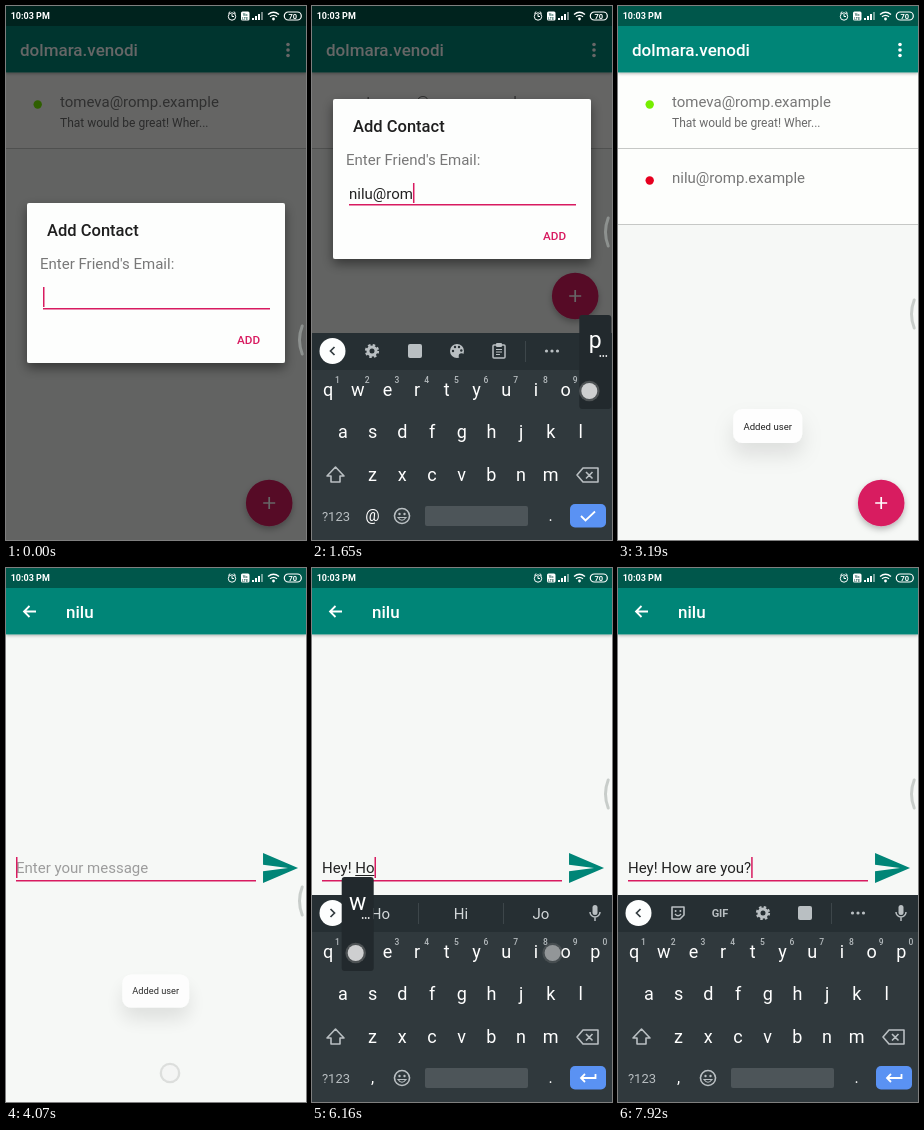
Write an HTML page that moves like this. It is 300 px wide and 534 px high and loops after 8000 ms.

```html
<!DOCTYPE html>
<html lang="en">
<head>
<meta charset="utf-8">
<title>Chat demo</title>
<style>
  html, body { margin: 0; width: 100%; height: 100%; overflow: hidden; background: #f6f8f6; }
  svg { display: block; width: 100vw; height: 100vh; }
  text { font-family: Roboto, "Noto Sans", sans-serif; white-space: pre; }
  .m { font-weight: 500; }
  .b { font-weight: 700; }
  .c { text-anchor: middle; }
</style>
</head>
<body>
<svg id="stage" viewBox="0 0 300 534"></svg>
<script>
const TICK = 110, LOOP = 8000;
const TEAL = '#008577', PINK = '#d81b60', INK = '#222', KEY = '#fff', SOFT = '#b9bfc2';
const ME = 'dolmara.venodi', OLD = 'tomeva@romp.example', MAIL = 'nilu@romp.example';
const NAME = 'nilu', MSG = 'Hey! How are you?';

// Ticks at which each character is pressed
const mailTicks = [4, 5, 6, 7, 9, 10, 11, 12, 15, 16, 17, 18, 19, 20, 21, 22, 23];
const msgTicks = [40, 41, 42, 46, 48, 52, 55, 56, 58, 59, 60, 61, 63, 64, 65, 66, 69];

// Motion tables: [tick, value]
const kbSteps = [[1, 207], [2, 90], [3, 15], [4, 0], [26, 0], [27, 60], [28, 150], [29, 207],
  [37, 207], [38, 110], [39, 30], [40, 0]];
const dialogSteps = [[2, 0], [3, -104]];
const fabSteps = [[2, 497], [3, 290], [26, 290], [27, 497]];
const handleSteps = [[2, 334], [3, 226], [27, 226], [28, 270], [29, 308], [30, 333],
  [37, 333], [38, 280], [39, 226]];
const dimSteps = [[25, 1], [26, .4], [27, 0]];
const chatSteps = [[31, 300], [32, 180], [33, 60], [34, 10], [35, 0]];
const fieldSteps = [[36, 207], [37, 0]];
const toastFade = [[26, 0], [27, .4], [28, .9], [29, 1], [36, 1], [37, .95], [38, .35], [39, 0]];
const toastSize = [[27, .95], [29, 1], [36, 1], [37, .967], [38, .93]];
const toastDrop = [[36, 0], [37, 3], [38, 6]];

const suggest = {
  H: 'H|He|Hi', He: 'He|Hey|Her', Hey: 'Hey|Get|Het', 'Hey! ': 'How|I|What',
  Ho: 'Ho|Hi|Jo', How: 'How|Hoe|Now', 'How ': 'are|is|do',
  a: 'a|are|and', ar: 'ar|are|at', are: 'are|ate|age', 'are ': 'you|the|we',
  y: 'y|you|your', yo: 'yo|you|to', you: 'you|your|yoyo'
};

const at = (n, steps) => {
  if (n <= steps[0][0]) return steps[0][1];
  for (let i = 1; i < steps.length; i++) {
    const [a, v] = steps[i - 1], [b, w] = steps[i];
    if (n <= b) return v + (w - v) * (n - a) / (b - a);
  }
  return steps[steps.length - 1][1];
};

// Markup helpers
const txt = (x, y, size, fill, s, cls = '', id = '') =>
  `<text x="${x}" y="${y}" font-size="${size}" fill="${fill}" class="${cls}" ${id && `id="${id}"`}>${s}</text>`;
const rect = (x, y, w, h, fill, r = 0, more = '') =>
  `<rect x="${x}" y="${y}" width="${w}" height="${h}" rx="${r}" fill="${fill}" ${more}/>`;
const dot = (x, y, r, fill, more = '') => `<circle cx="${x}" cy="${y}" r="${r}" fill="${fill}" ${more}/>`;
const line = (d, stroke, w = 1.5, more = '') =>
  `<path d="${d}" fill="none" stroke="${stroke}" stroke-width="${w}" ${more}/>`;
const grp = (id, s, more = '') => `<g id="${id}" ${more}>${s}</g>`;
const move = (x, y, s) => `<g transform="translate(${x} ${y})">${s}</g>`;

// Keyboard geometry
const keys = {};
['qwertyuiop', 'asdfghjkl', 'zxcvbnm'].forEach((row, r) =>
  [...row].forEach((k, i) => keys[k] = [[16, 31, 60.5][r] + i * 29.7, [384, 425.5, 468.5][r]]));
Object.assign(keys, { '@': [60, 510], ' ': [164, 510], '.': [238, 510], '!': [238, 510], '?': [238, 510] });
const slip = { o: -13, p: -6, w: -2 };

const dots = (x, y) => [-5.5, 0, 5.5].map(d => dot(x + d, y, 1.6, SOFT)).join('');
const gear = x => move(x, 345, dot(0, 0, 4, 'none', `stroke="${SOFT}" stroke-width="3"`) +
  dot(0, 0, 6, 'none', `stroke="${SOFT}" stroke-width="2.2" stroke-dasharray="2.5 2.212"`));
const square = x => rect(x - 7, 338, 14, 14, SOFT, 2);
const mic = move(283, 345, rect(-2.5, -8, 5, 10, SOFT, 2.5) + line('M-5 -1a5 5 0 0 0 10 0M0 4V8', SOFT));
const palette = move(145, 345, dot(0, 0, 7, SOFT) + dot(4.5, 5, 2.8, '#262f33') +
  [[-4, 0], [-2, -4], [2, -4], [4.3, -.5]].map(([x, y]) => dot(x, y, 1.2, '#262f33')).join(''));
const clip = move(187, 345, rect(-6, -6, 12, 13, 'none', 1, `stroke="${SOFT}" stroke-width="1.5"`) +
  rect(-3, -8, 6, 4, SOFT, 1) + line('M-3 -1.5H3M-3 1H3M-3 3.5H1', SOFT, 1.2));
const sticker = move(60, 345, line('M-6 -6H6V2L2 6H-6Z', SOFT, 1.6, 'stroke-linejoin="round"') +
  dot(-2.4, -2, 1, SOFT) + dot(2.4, -2, 1, SOFT) + line('M-3 1Q0 4.5 3 1', SOFT, 1.3));
const arrow = d => dot(20.5, 345, 13, '#fdfefe') +
  line(`M${20.5 - 2 * d} 341l${4 * d} 4l${-4 * d} 4`, '#333c40', 1.7);
const rule = x => line(`M${x} 335V356`, '#3d464a', 1);

const keyboard = () => {
  let s = rect(0, 327, 300, 207, '#30393d') + rect(0, 327, 300, 37, '#262f33');
  [...'qwertyuiop'].forEach((k, i) =>
    s += txt(keys[k][0] + 9.5, 377, 8.5, '#b4babd', (i + 1) % 10, 'c m'));
  for (const k in keys) if (/[a-z]/.test(k))
    s += txt(keys[k][0], keys[k][1] + 6, 18, KEY, k, 'c');
  s += line('M23.5 461L32 470H28V476H19V470H15Z', SOFT, 1.6, 'stroke-linejoin="round"');
  s += line('M271 462H286V476H271L265 469ZM274 466l6.5 6.5M280.5 466l-6.5 6.5', SOFT, 1.6, 'stroke-linejoin="round"');
  s += txt(24, 514.5, 13, SOFT, '?123', 'c') + txt(60.5, 515, 16, KEY, '', 'c', 'side');
  s += dot(90, 510, 7.5, 'none', `stroke="${SOFT}" stroke-width="1.6"`) +
    dot(87.5, 508, 1.2, SOFT) + dot(92.5, 508, 1.2, SOFT) + line('M86 511.5Q90 517 94 511.5Z', SOFT, 1.2);
  s += rect(113, 500, 103, 20, '#4d5559', 2) + txt(238.5, 515, 16, KEY, '.', 'c');
  s += rect(258, 498, 36, 23.5, '#5a92f3', 5) + line('', '#fff', 1.8, 'id="enter"');
  s += grp('barMail', arrow(-1) + gear(60) + square(103) + palette + clip + rule(213.5) + dots(240, 345));
  s += grp('barTools', arrow(-1) + sticker + txt(102, 349, 11, SOFT, 'GIF', 'c b') + gear(145) +
    square(187) + rule(213.5) + dots(240, 345) + mic);
  s += grp('barWords', arrow(1) + rule(106.5) + rule(191.5) + mic +
    [68.5, 149, 229].map((x, i) => txt(x, 350.5, 15, '#d3d8da', '', 'c', 'word' + i)).join(''));
  return s;
};

const appBar = rect(0, 0, 300, 66.4, TEAL, 0, 'filter="url(#low)"') + rect(0, 0, 300, 20, '#00574b');

const row = (y, color, mail) => rect(0, y, 300, 75, '#fdfefc') + rect(0, y + 75, 300, 1, '#c6c8c6') +
  dot(31.7, y + 31.5, 4.2, color) + txt(54, y + 34, 15, '#777', mail);

const list = rect(0, 0, 300, 534, '#f6f8f6') +
  row(67, '#76ee00', OLD) + txt(54, 121, 12, '#6a6a6a', 'That would be great! Wher...') +
  grp('newRow', row(143, '#e6001f', MAIL)) +
  appBar + txt(14, 50, 17, '#fff', ME, 'm') +
  [38.5, 44, 49.5].map(y => dot(282, y, 1.8, '#fff')).join('') +
  grp('fab', dot(0, 0, 23.3, PINK, 'filter="url(#mid)"') + line('M-6 0H6M0 -6V6', '#fff', 1.7));

const chat = rect(0, 0, 300, 534, '#f6f8f6') + appBar +
  line('M30 43.5H18M23.5 38L18 43.5L23.5 49', '#fff', 1.8) + txt(60, 50, 17, '#fff', NAME, 'm') +
  grp('field', txt(10, 305, 15, '#9c9c9c', 'Enter your message', '', 'hint') +
    txt(10, 305, 15, INK, '', '', 'msg') + rect(10, 307, 0, 1, INK, 0, 'id="under"') +
    rect(10, 312, 240, 1.5, PINK) + rect(10, 289, 1.5, 21, PINK, 0, 'id="msgCaret"') +
    `<path transform="translate(253.7 280) scale(1.667)" fill="${TEAL}" d="M2 21L23 12 2 3V10L17 12 2 14Z"/>`);

const dialog = rect(21, 197, 258, 160, '#fdfefd', 2, 'filter="url(#deep)"') +
  txt(41, 229.5, 16.5, '#1f1f1f', 'Add Contact', 'm') +
  txt(34, 263, 15, '#787878', "Enter Friend's Email:") +
  txt(37, 297, 15, INK, '', '', 'mail') + rect(37, 302, 227, 1.5, PINK) +
  rect(37, 281, 1.5, 20, PINK, 0, 'id="mailCaret"') + txt(231, 338, 11.7, PINK, 'ADD', 'm');

const toast = rect(-34.5, -17, 69, 34, '#fefefe', 9, 'filter="url(#high)"') +
  txt(0, 3.5, 9.6, INK, 'Added user', 'c');

const status = txt(4.7, 13.3, 9, '#fff', '10:03 PM', 'b') +
  line('M222.5 7.5L224 5.5M229.5 7.5L228 5.5M226 8V10.5H228', '#fff', 1) +
  dot(226, 10.5, 3.7, 'none', 'stroke="#fff"') +
  rect(235, 5.5, 8.5, 9, '#fff', 1.5) + txt(239.2, 9.7, 4, '#00443b', 'Vo', 'c m') +
  txt(239.2, 13.5, 3.6, '#00443b', 'LTE', 'c m') +
  [0, 1, 2, 3].map(i => rect(246 + i * 3, 12 - i * 2, 2, 2 + i * 2, '#fff', 0, i > 2 ? 'opacity=".45"' : '')).join('') +
  line('M262 8.5Q267.5 4 273 8.5M264 10.8Q267.5 8 271 10.8', '#fff', 1.4) +
  dot(267.5, 13, 1.4, '#fff') + rect(278.3, 6, 17, 8, 'none', 4, 'stroke="#fff" stroke-width="1.2"') +
  txt(286.8, 12.8, 7.5, '#fff', '70', 'c b');

const $ = id => document.getElementById(id);
const set = (id, name, v) => $(id).setAttribute(name, v);
const show = (id, on) => $(id).style.display = on ? '' : 'none';
const shift = (id, x, y) => set(id, 'transform', `translate(${x} ${y})`);

const shadow = (id, dy, blur, a) => `<filter id="${id}" x="-40%" y="-60%" width="180%" height="260%">
  <feDropShadow dx="0" dy="${dy}" stdDeviation="${blur}" flood-opacity="${a}"/></filter>`;
$('stage').innerHTML = '<defs>' + shadow('low', 1.2, 1.5, .3) + shadow('mid', 3, 3, .28) +
  shadow('deep', 5, 6, .45) + shadow('high', 12, 10, .1) + '</defs>' +
  list + grp('chat', chat) + rect(0, 0, 300, 534, '#000', 0, 'id="dim"') +
  grp('dialog', dialog) + grp('kb', keyboard()) + grp('toast', toast) +
  line('M296.2 -14Q290.8 0 296.2 14', '#aab0ad', 3, 'id="handle" stroke-linecap="round" opacity=".6"') +
  grp('touch', '') + status;

const presses = [[MAIL, mailTicks], [MSG, msgTicks]].flatMap(([s, ticks]) =>
  ticks.map((n, i) => {
    const k = s[i].toLowerCase(), [x, y] = keys[k];
    return { n, k, x, y, tx: x + (slip[k] || 0), ty: y + 1 };
  }));
presses.push({ n: 25, tx: 243, ty: 231 }, { n: 30, tx: 150, ty: 180 }, { n: 36, tx: 164, ty: 505 });

const popup = ({ k, x, y }) => rect(x - 16, y - 75, 32, 94, '#22292d', 3) +
  txt(x, y - 42, 23, '#fff', k, 'c') +
  (y < 400 ? [5, 8, 11].map(d => dot(x + d, y - 34, .9, '#eee')).join('') : '');
const ring = ({ tx, ty }, alpha) => `<g opacity="${alpha}">` +
  dot(tx, ty, 10.3, '#8d8f8e', 'opacity=".45"') + dot(tx, ty, 8, '#fafafa', 'opacity=".85"') + '</g>';

const touches = n => {
  let pops = '', rings = '';
  for (const p of presses) {
    const age = n - p.n;
    if (age < 0 || age > 2) continue;
    if (age === 0 && /[a-z]/.test(p.k || '')) pops += popup(p);
    if (age < 2) rings += ring(p, age ? .55 : .9);
    else if (p.k) rings += dot(p.x, p.y, 9.5, '#000', 'opacity=".1"');
  }
  return pops + rings;
};

const typed = (s, ticks, n) => s.slice(0, ticks.filter(k => k < n).length);

function draw(n) {
  const inChat = n >= 34, dim = at(n, dimSteps);
  shift('kb', 0, at(n, kbSteps));
  shift('dialog', 0, at(n, dialogSteps));
  shift('fab', 263.2, at(n, fabSteps));
  shift('handle', 0, at(n, handleSteps));
  shift('chat', at(n, chatSteps), 0);
  shift('field', 0, at(n, fieldSteps));
  set('dim', 'opacity', dim * .6);
  set('dialog', 'opacity', dim);
  set('toast', 'opacity', at(n, toastFade));
  set('toast', 'transform', `translate(149.7 ${420 + at(n, toastDrop)}) scale(${at(n, toastSize)})`);
  show('newRow', n >= 27);
  show('chat', n >= 32);

  $('mail').textContent = typed(MAIL, mailTicks, n);
  set('mailCaret', 'x', 37 + $('mail').getComputedTextLength());

  const msg = typed(MSG, msgTicks, n), word = msg.match(/[A-Za-z]*$/)[0];
  $('msg').textContent = msg;
  show('hint', !msg);
  const width = msg ? $('msg').getComputedTextLength() : 0;
  const tail = word ? $('msg').getSubStringLength(msg.length - word.length, word.length) : 0;
  set('msgCaret', 'x', 10 + width);
  set('under', 'x', 10 + width - tail);
  set('under', 'width', tail);

  const words = suggest[(msg.match(/\S+ ?$/) || [''])[0]];
  show('barMail', !inChat);
  show('barTools', inChat && !words);
  show('barWords', inChat && words);
  if (words) words.split('|').forEach((w, i) => $('word' + i).textContent = w);
  $('side').textContent = inChat ? ',' : '@';
  set('enter', 'd', inChat ? 'M283.5 506V510H269M273 506L269 510L273 514' : 'M269 510L273.5 514.5L283 505.5');
  $('touch').innerHTML = touches(n);
}

let last = -1;
const start = performance.now();
function loop() {
  const n = Math.floor((performance.now() - start) % LOOP / TICK);
  if (n !== last) draw(last = n);
  requestAnimationFrame(loop);
}
loop();
</script>
</body>
</html>
```
